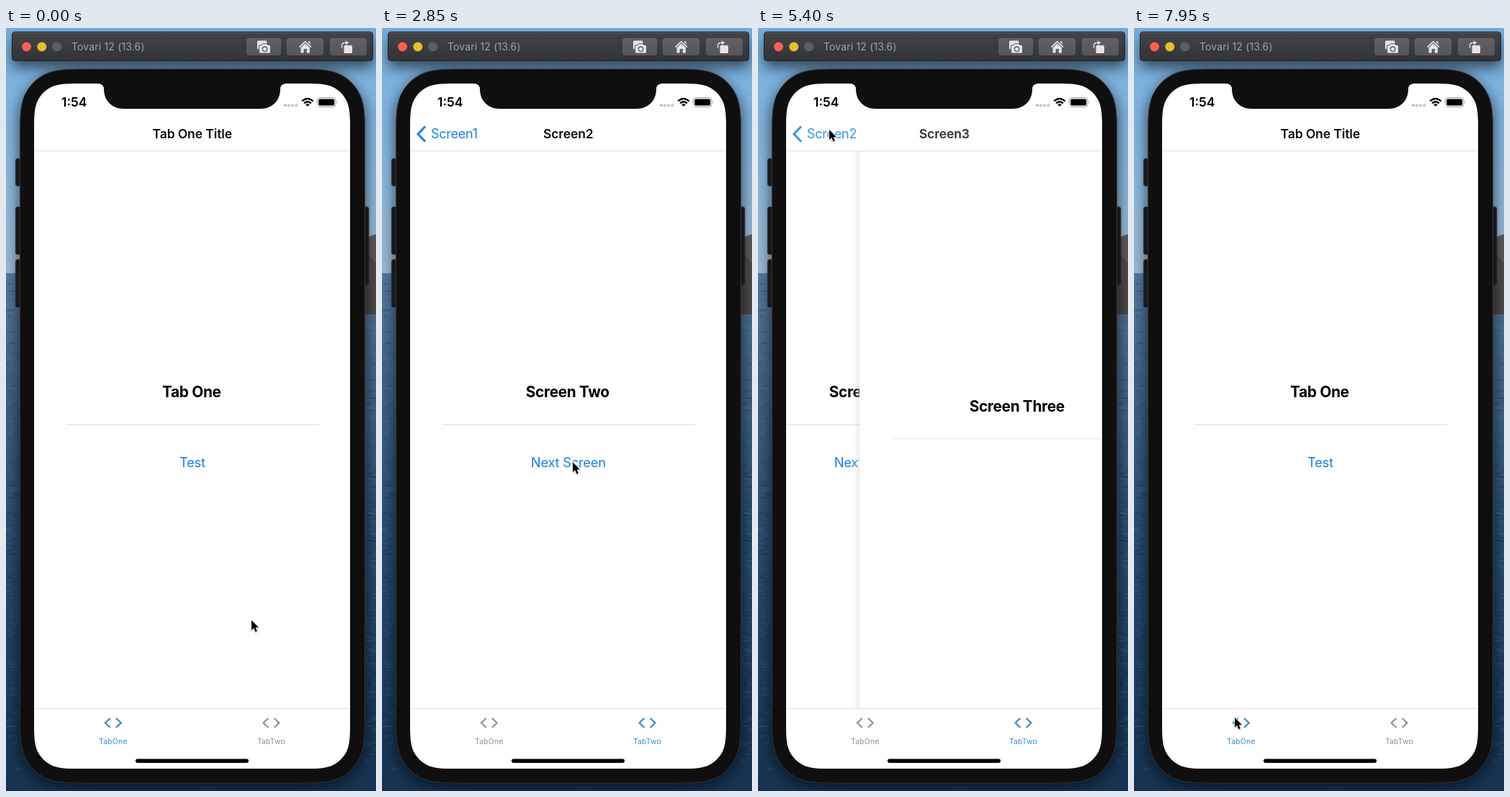
Write an HTML page that moves like this. It is 514 px wide and 1058 px high and loops after 8000 ms.

```html
<!DOCTYPE html>
<html lang="en">
<head>
<meta charset="utf-8">
<title>Tab and stack navigation</title>
<style>
  html, body { margin: 0; width: 100%; height: 100%; overflow: hidden; background: #15304f; }
  svg { display: block; width: 514px; height: 1058px; font-family: Inter, "Liberation Sans", sans-serif; }
  .mid { text-anchor: middle; }
  .heading { font-size: 20.8px; font-weight: 700; letter-spacing: -.32px; }
  .link { font-size: 18.4px; letter-spacing: -.28px; fill: #1a7ee4; }
  .title { font-size: 17.5px; font-weight: 600; letter-spacing: -.1px; fill: #0c0c0d; }
  .back { font-size: 18px; letter-spacing: -.25px; fill: #1a7ee4; }
  .label { font-size: 10.4px; letter-spacing: .2px; stroke: none; }
</style>
</head>
<body>
<svg viewBox="0 0 514 1058">
  <defs>
    <linearGradient id="sky" x1="0" y1="0" x2="0" y2="1">
      <stop offset="0" stop-color="#76afdf"/>
      <stop offset=".5" stop-color="#84b4dd"/>
      <stop offset="1" stop-color="#9ab7cf"/>
    </linearGradient>
    <linearGradient id="sea" x1="0" y1="0" x2="0" y2="1">
      <stop offset="0" stop-color="#53769a"/>
      <stop offset=".2" stop-color="#436486"/>
      <stop offset=".5" stop-color="#2a4c70"/>
      <stop offset="1" stop-color="#153250"/>
    </linearGradient>
    <linearGradient id="bar" x1="0" y1="0" x2="0" y2="1">
      <stop offset="0" stop-color="#434447"/>
      <stop offset="1" stop-color="#323336"/>
    </linearGradient>
    <linearGradient id="key" x1="0" y1="0" x2="0" y2="1">
      <stop offset="0" stop-color="#616265"/>
      <stop offset="1" stop-color="#545558"/>
    </linearGradient>
    <linearGradient id="edge">
      <stop offset="0" stop-color="#c8d2d2" stop-opacity="0"/>
      <stop offset="1" stop-color="#c8d2d2" stop-opacity=".4"/>
    </linearGradient>
    <filter id="soft" x="-20%" y="-20%" width="140%" height="140%"><feGaussianBlur stdDeviation="9"/></filter>
    <filter id="faint" x="-60%" y="-60%" width="220%" height="220%"><feGaussianBlur stdDeviation="1.3"/></filter>
    <clipPath id="content"><rect x="39" y="171" width="439" height="772"/></clipPath>
    <path id="arrow" d="M0 0V14L3.2 11.1 5.5 16.4 7.9 15.3 5.7 10.2H10Z"/>
    <path id="code" d="M-4 -6.5L-11 0L-4 6.5M4 -6.5L11 0L4 6.5" fill="none" stroke-width="2"/>
  </defs>

  <!-- desktop -->
  <rect width="514" height="341" fill="url(#sky)"/>
  <rect y="340" width="514" height="718" fill="url(#sea)"/>
  <g id="waves" fill="none"></g>
  <path d="M494 299L503 290 508 288 514 286V397H494Z" fill="#5b585a"/>
  <path d="M499 330L506 318 514 326V397H499Z" fill="#4c494b"/>
  <g filter="url(#soft)">
    <rect x="17" y="62" width="484" height="990" rx="66" opacity=".55"/>
    <rect x="9" y="14" width="501" height="42" rx="5" opacity=".55"/>
  </g>

  <!-- simulator toolbar -->
  <rect x="8.5" y="5.5" width="501" height="40" rx="4" fill="url(#bar)" stroke="#232427"/>
  <path d="M12 6.5H506" stroke="#5c5e62"/>
  <circle cx="28.5" cy="26" r="6.5" fill="#f75e56"/>
  <circle cx="49.8" cy="26" r="6.5" fill="#e5c02f"/>
  <circle cx="70.8" cy="26" r="6.5" fill="#5d5e61"/>
  <text x="91" y="31" font-size="13.9" letter-spacing=".2" fill="#a2a3a5">Tovari 12 (13.6)</text>
  <g fill="url(#key)">
    <rect x="334" y="14" width="48" height="24" rx="4"/>
    <rect x="390" y="14" width="51" height="24" rx="4"/>
    <rect x="450" y="14" width="51" height="24" rx="4"/>
  </g>
  <g fill="#e4e4e5">
    <rect x="349" y="17.5" width="13.5" height="12" rx="1.5"/>
    <path d="M353 23.5H355.5L357 21.7H362L363.5 23.5H366Q367.5 23.5 367.5 25V33.5Q367.5 35 366 35H353Q351.5 35 351.5 33.5V25Q351.5 23.5 353 23.5Z" stroke="#5a5b5e"/>
    <circle cx="359.5" cy="29.2" r="3.2" fill="none" stroke="#5a5b5e" stroke-width="1.3"/>
    <path d="M415.7 17.5L424.5 26 423.3 27.2 415.7 20 408.1 27.2 406.9 26ZM420.3 18.5H422.5V22.7L420.3 20.6ZM409.5 27.2L415.7 21.4 421.9 27.2V34.5H417.8V29H413.6V34.5H409.5Z"/>
    <rect x="469.5" y="24" width="11.5" height="11" rx="1.5"/>
    <path d="M466.5 27.5V25Q466.5 20.5 471 20.5H473" fill="none" stroke="#e4e4e5" stroke-width="1.5"/>
    <path d="M472 17.3L476.2 20.5 472 23.7Z"/>
  </g>

  <!-- device -->
  <g fill="#18191c" stroke="#292a2d" stroke-width=".7">
    <rect x="13.3" y="181" width="9" height="38" rx="3"/>
    <rect x="13.3" y="248" width="9" height="66" rx="3"/>
    <rect x="13.3" y="321" width="9" height="66" rx="3"/>
    <rect x="495" y="248" width="9" height="108" rx="3"/>
  </g>
  <path id="body" fill="#0f0f10" stroke="#343538"/>
  <path id="screen" fill="#fff"/>
  <path d="M128 76V77Q136 77.5 136 85C136 100 147 112 163 112H354C370 112 381 100 381 85Q381 77.5 389 77V76Z" fill="#0f0f10"/>

  <!-- status bar -->
  <text x="77" y="109.3" font-size="17.5" font-weight="600">1:54</text>
  <path d="M386 107.2H405.5" stroke="#c7c7c9" stroke-width="3.6" stroke-dasharray="4 1.1"/>
  <g fill="none" stroke="#000" stroke-width="2.3">
    <path d="M411.3 101.4Q419 94.5 426.7 101.4"/>
    <path d="M414.1 104.4Q419 100.2 423.9 104.4"/>
  </g>
  <path d="M416.2 106.2Q419 104 421.8 106.2L419 109Z"/>
  <rect x="432.5" y="96.7" width="25.5" height="12.6" rx="3.4" fill="none" stroke="#949496"/>
  <rect x="434.3" y="98.5" width="21.9" height="9" rx="1.8"/>
  <path d="M459.4 101Q461 103 459.4 105Z" fill="#949496"/>

  <g id="cards" clip-path="url(#content)"></g>
  <path d="M39 170.5H478" stroke="#dedfe0"/>
  <g id="heads"></g>

  <!-- tab bar -->
  <path d="M39 943.5H478" stroke="#dedfe0"/>
  <g id="tabs"></g>
  <rect x="180" y="1013.6" width="157" height="5.4" rx="2.7"/>

  <g id="cursor">
    <use href="#arrow" y="1.5" opacity=".4" filter="url(#faint)"/>
    <use href="#arrow" stroke="#fff" stroke-width="1.8" stroke-linejoin="round"/>
    <use href="#arrow"/>
  </g>
</svg>

<script>
const LOOP = 8000, STEP = 50, LEFT = 39, WIDTH = 439, MID = LEFT + WIDTH / 2;
const TAB_TWO_AT = 800, TAB_ONE_AT = 7600;
const PUSHES = [2000, 3150], POPS = [5350, 6033];
const CURSOR = [
  [0, 341, 821], [200, 341, 821], [600, 361, 958], [1050, 361, 958],
  [1700, 265, 602], [4300, 265, 602], [5050, 99, 141], [5550, 99, 141],
  [5850, 101, 145], [6500, 101, 145], [7350, 140, 956], [LOOP, 140, 956]
];

const byId = id => document.getElementById(id);
const clamp = v => Math.max(0, Math.min(1, v));
const ease = v => v < .5 ? 2 * v * v : 1 - 2 * (1 - v) ** 2;

function add(parent, markup) {
  parent.insertAdjacentHTML('beforeend', markup);
  return parent.lastElementChild;
}

function makeCard(heading, link) {
  const y = link ? 0 : 20;
  const line = link ? 1.7 : 1;
  return add(byId('cards'), `<g>
    <rect x="${LEFT - 9}" y="171" width="9" height="772" fill="url(#edge)"/>
    <rect x="${LEFT}" y="171" width="${WIDTH}" height="772" fill="#fff"/>
    <text class="mid heading" x="${MID - .7}" y="${512.3 + y}">${heading}</text>
    <rect x="83" y="${549 + y}" width="352" height="${line}" fill="#e6e9ea"/>
    <text class="mid link" x="${MID + .3}" y="609.2">${link}</text></g>`);
}

function makeHead(title, back) {
  const button = back ? `<path d="M60 136.5L50 147L60 157.5" fill="none" stroke="#1a7ee4" stroke-width="3"/>
    <text class="back" x="68" y="153.3">${back}</text>` : '';
  return add(byId('heads'), `<g><text class="mid title" x="${MID + .3}" y="153.3">${title}</text>${button}</g>`);
}

function makeTab(x, name) {
  return add(byId('tabs'), `<g><use href="#code" x="${x}" y="963.5"/>
    <text class="mid label" x="${x}" y="993">${name}</text></g>`);
}

const homeCard = makeCard('Tab One', 'Test');
const homeHead = makeHead('Tab One Title');
const cards = [
  makeCard('Screen One', 'Next Screen'),
  makeCard('Screen Two', 'Next Screen'),
  makeCard('Screen Three', '')
];
const heads = [makeHead('Screen1'), makeHead('Screen2', 'Screen1'), makeHead('Screen3', 'Screen2')];
const tabs = [makeTab(148.8, 'TabOne'), makeTab(368.5, 'TabTwo')];

// Rectangle whose corners bend in gradually, as on the device.
function smoothRect(x, y, w, h, r) {
  const bend = [[1.528, 0], [1.088, 0], [.868, 0], [.631, .075], [.373, .169],
    [.169, .373], [.075, .631], [0, .868], [0, 1.088], [0, 1.528]];
  const corner = (right, bottom) => {
    const points = bend.map(([u, v]) => [
      right ? x + w - u * r : x + u * r,
      bottom ? y + h - v * r : y + v * r
    ]);
    if (right === bottom) points.reverse();
    return points[0] + 'C' + points.slice(1).join(' ');
  };
  return `M${corner(0, 0)}L${corner(1, 0)}L${corner(1, 1)}L${corner(0, 1)}Z`;
}

function drawWaves() {
  let seed = 7;
  const rnd = () => (seed = seed * 16807 % 2147483647) / 2147483647;
  let light = '', dark = '';
  for (let i = 0; i < 420; i++) {
    const y = 350 + rnd() * 706;
    const x = y > 1010 ? rnd() * 514 : (rnd() < .5 ? -4 : 496) + rnd() * 16;
    const stroke = `M${x.toFixed(1)} ${y.toFixed(1)}l${(4 + rnd() * 8).toFixed(1)} ${(rnd() * 3 - 1).toFixed(1)}`;
    if (i % 2) light += stroke; else dark += stroke;
  }
  byId('waves').innerHTML = `<path d="${light}" stroke="#6d94b8" opacity=".2"/>
    <path d="${dark}" stroke="#051a33" opacity=".25"/>`;
}

// Critically damped spring from 0 to 1.
function spring(ms) {
  if (ms <= 0) return 0;
  const k = Math.sqrt(1000 / 3) * ms / 1000;
  return 1 - Math.exp(-k) * (1 + k);
}

// Opacity of a link: dims before release, recovers after it.
function press(t, release) {
  const d = t - release;
  const amount = d < 0 ? ease(clamp((d + 130) / 100)) : 1 - ease(clamp(d / 250));
  return 1 - .7 * amount;
}

function stackDepth(t) {
  const total = times => times.reduce((sum, at) => sum + spring(t - at), 0);
  const depth = total(PUSHES) - total(POPS);
  return Math.abs(depth - Math.round(depth)) < .002 ? Math.round(depth) : depth;
}

function cursorAt(t) {
  const i = CURSOR.findIndex(key => key[0] > t);
  const [t0, x0, y0] = CURSOR[i - 1], [t1, x1, y1] = CURSOR[i];
  const p = ease((t - t0) / (t1 - t0));
  return [x0 + (x1 - x0) * p, y0 + (y1 - y0) * p];
}

const show = (node, on) => node.setAttribute('display', on ? 'inline' : 'none');

function paintTab(tab, active) {
  tab.setAttribute('stroke', active ? '#2f80d2' : '#8e8e90');
  tab.setAttribute('fill', active ? '#3f89d6' : '#8e8e90');
}

function render(t) {
  const second = t >= TAB_TWO_AT && t < TAB_ONE_AT;
  const depth = stackDepth(t);

  show(homeCard, !second);
  show(homeHead, !second);
  paintTab(tabs[0], !second);
  paintTab(tabs[1], second);

  cards.forEach((card, k) => {
    const shift = WIDTH * (clamp(k - depth) - .3 * clamp(depth - k));
    show(card, second && depth > k - 1);
    card.setAttribute('transform', `translate(${shift.toFixed(2)} 0)`);
    if (k < 2) card.querySelector('.link').setAttribute('opacity', press(t, PUSHES[k]));
  });

  heads.forEach((head, k) => {
    const alpha = clamp(1 - Math.abs(depth - k));
    show(head, second && alpha > 0);
    head.setAttribute('opacity', alpha);
  });

  const [x, y] = cursorAt(t);
  byId('cursor').setAttribute('transform', `translate(${x.toFixed(1)} ${y.toFixed(1)})`);
}

byId('body').setAttribute('d', smoothRect(19.5, 57, 479, 990, 64));
byId('screen').setAttribute('d', smoothRect(39, 77, WIDTH, 950, 44));
drawWaves();

// The picture holds for one step at a time; the small lead absorbs timer jitter.
const start = performance.now();
function tick() {
  const elapsed = performance.now() - start + 8;
  render(Math.floor(elapsed / STEP) * STEP % LOOP);
  requestAnimationFrame(tick);
}
render(0);
requestAnimationFrame(tick);
</script>
</body>
</html>
```
